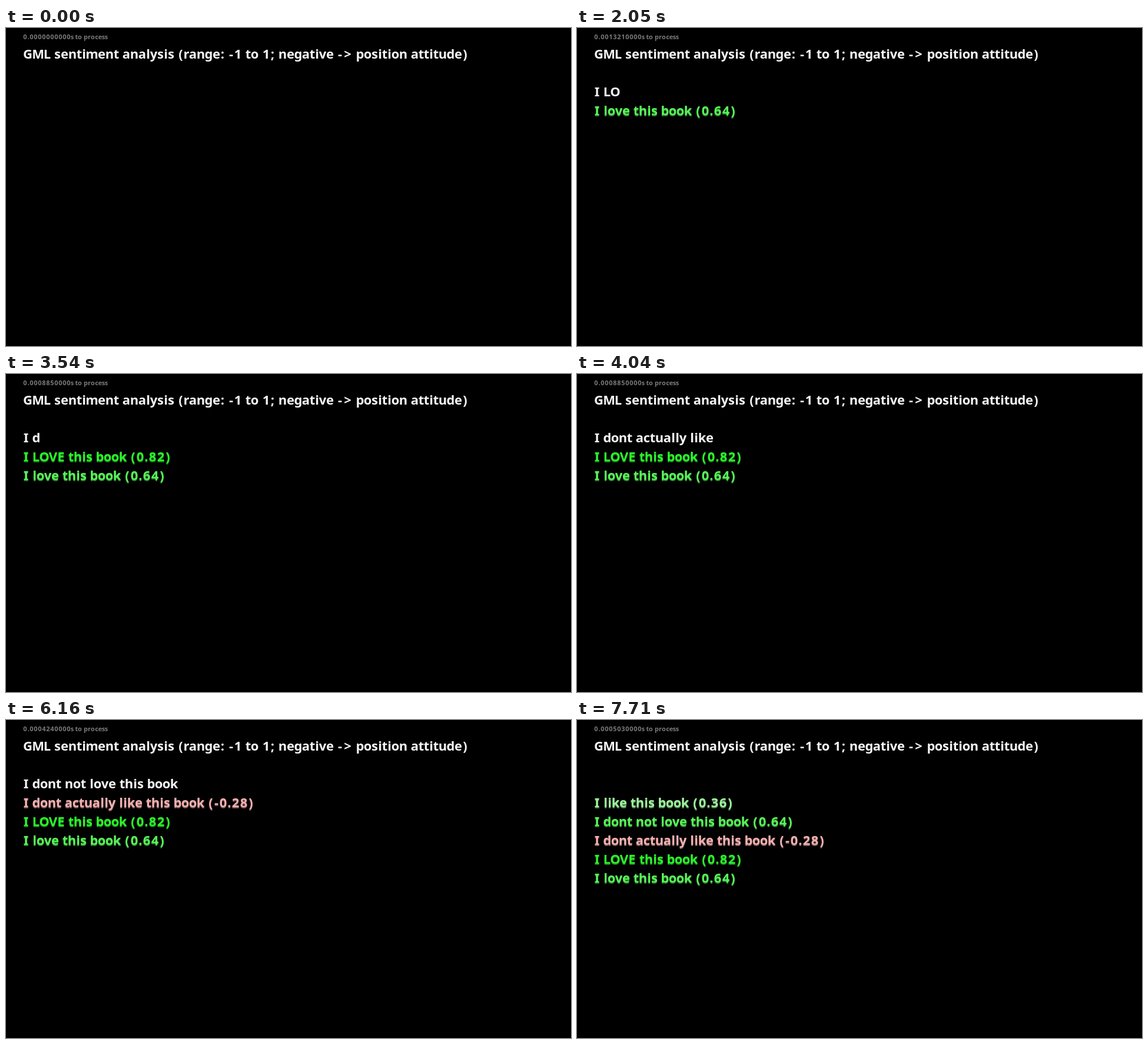
Write an HTML page with a canvas that moves like this. It is 960 px wide and 540 px high and loops after 8000 ms.

```html
<!DOCTYPE html>
<html lang="en">
<head>
<meta charset="utf-8">
<title>Sentiment analysis</title>
<style>
html, body { margin: 0; width: 100%; height: 100%; overflow: hidden; background: #000; }
canvas { display: block; }
</style>
</head>
<body>
<canvas id="stage" width="960" height="540"></canvas>
<script>
const ctx = document.getElementById('stage').getContext('2d');
const LOOP = 8000, LEFT = 29, LINE = 32, INPUT_Y = 116;

// Typing runs from start to last in even steps, up to reach letters;
// the whole sentence shows at full and is scored at submit.
const entries = [
  { text: 'I love this book', score: 0.64, cost: 0.001321, start: 500, last: 886, steps: 6, submit: 950 },
  { text: 'I LOVE this book', score: 0.82, cost: 0.000885, start: 1960, last: 2371, steps: 6, submit: 2440 },
  { text: 'I dont actually like this book', score: -0.28, cost: 0.000424, start: 3470, last: 4220, steps: 15, reach: 27, full: 4330, submit: 4390 },
  { text: 'I dont not love this book', score: 0.64, cost: 0.001865, start: 5420, last: 6142, steps: 15, submit: 6190 },
  { text: 'I like this book', score: 0.36, cost: 0.000503, start: 7240, last: 7658, steps: 8, submit: 7710 }
];

// Letter advances in thousandths of an em, rounded to whole pixels when set.
const advances = {};
for (const [chars, width] of [
  [' ', 293], ['()', 454], ['-', 430], ['.', 330], ['0123456789', 637], [':;', 363], ['>', 818],
  ['G', 745], ['I', 483], ['L', 573], ['M', 898], ['O', 771], ['V', 678], ['E', 616],
  ['a', 599], ['bdgp', 629], ['c', 527], ['e', 594], ['hnu', 640], ['il', 330], ['k', 603],
  ['m', 954], ['o', 617], ['r', 434], ['s', 515], ['t', 416], ['vy', 578]
]) for (const c of chars) advances[c] = width / 1000;

function drawText(text, y, color, small) {
  const em = small ? 32 / 3 : 64 / 3;
  ctx.font = `bold ${small ? 11 : 22}px "Noto Sans", "Open Sans", sans-serif`;
  ctx.fillStyle = color;
  let x = LEFT;
  for (const c of text) {
    const width = Math.round(advances[c] * em);
    ctx.fillText(c, x + (width - ctx.measureText(c).width) / 2, y);
    x += width;
  }
}

function scoreColor(score, light) {
  const full = Math.round(255 * light);
  const faded = Math.round(full * (1 - Math.abs(score)));
  return score < 0 ? `rgb(${full},${faded},${faded})` : `rgb(${faded},${full},${faded})`;
}

function typed(entry, t) {
  const { text, start, last, steps, reach = text.length, full = entry.submit } = entry;
  if (t >= full) return text;
  const step = Math.min(steps, Math.floor((t - start) / (last - start) * steps + 1e-6));
  return text.slice(0, 1 + Math.round((reach - 1) * step / steps));
}

function draw(t) {
  ctx.fillStyle = '#000';
  ctx.fillRect(0, 0, 960, 540);
  const scored = entries.filter(e => t >= e.submit).reverse();
  const current = entries.find(e => t >= e.start && t < e.submit);

  drawText((scored.length ? scored[0].cost : 0).toFixed(10) + 's to process', 19, '#7a7a7a', true);
  drawText('GML sentiment analysis (range: -1 to 1; negative -> position attitude)', 52, '#f4f4f4');
  if (current) drawText(typed(current, t), INPUT_Y, '#f4f4f4');

  scored.forEach(({ text, score }, i) => {
    const label = `${text} (${score.toFixed(2)})`;
    const y = INPUT_Y + LINE * (i + 1);
    drawText(label, y + 2, scoreColor(score, 0.5));
    drawText(label, y, scoreColor(score, 0.96));
  });
}

const begin = performance.now();
function frame() {
  draw((performance.now() - begin) % LOOP);
  requestAnimationFrame(frame);
}
frame();
</script>
</body>
</html>
```
